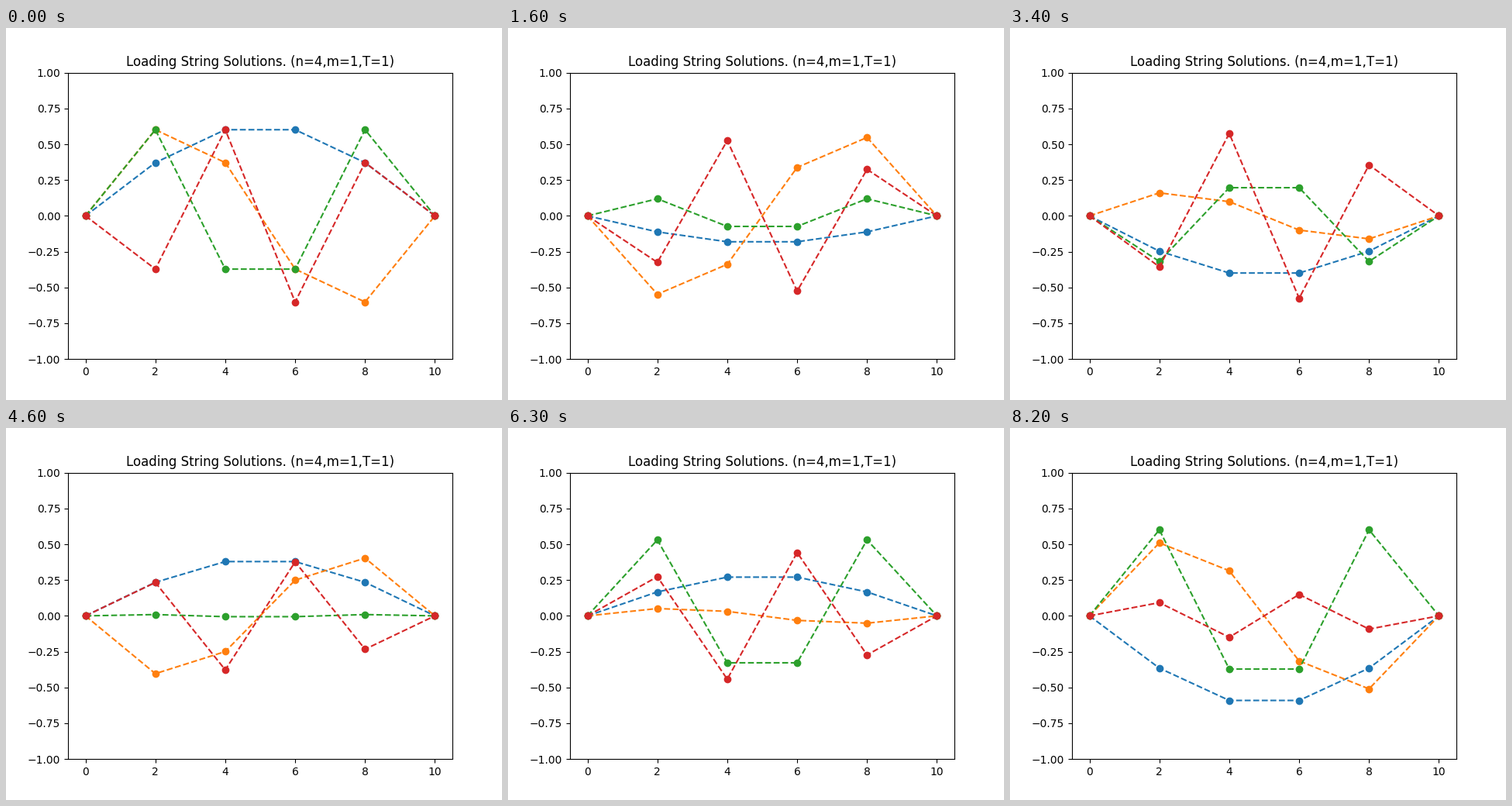
Recreate the animation shown at these times as a matplotlib script. Size 640x480 px, loop 8.3 s.

```python
import numpy as np
import matplotlib.pyplot as plt
from matplotlib.animation import FuncAnimation

N, MASS, TENSION, LENGTH = 4, 1, 1, 10
FRAMES, INTERVAL, DT = 83, 100, 0.3

# Normal modes of a string loaded with N equal masses
k = np.arange(1, N + 1)
j = np.arange(N + 2)
x = j * LENGTH / (N + 1)
omega = 2 * np.sqrt(TENSION * N / (MASS * LENGTH)) * np.sin(k * np.pi / (2 * (N + 1)))
signs = np.array([1, 1, 1, -1])
modes = signs[:, None] * np.sqrt(2 / (N + 1)) * np.sin(np.outer(k, j) * np.pi / (N + 1))

fig, ax = plt.subplots(figsize=(6.4, 4.8), dpi=100)
ax.set_title(f"Loading String Solutions. (n={N},m={MASS},T={TENSION})")
ax.set_xlim(-0.5, 10.5)
ax.set_ylim(-1, 1)
lines = [ax.plot(x, mode, "o--")[0] for mode in modes]


def update(frame):
    for line, mode, w in zip(lines, modes, omega):
        line.set_ydata(mode * np.cos(w * frame * DT))
    return lines


anim = FuncAnimation(fig, update, frames=FRAMES, interval=INTERVAL,
                     repeat=True, repeat_delay=0)
plt.show()
```
